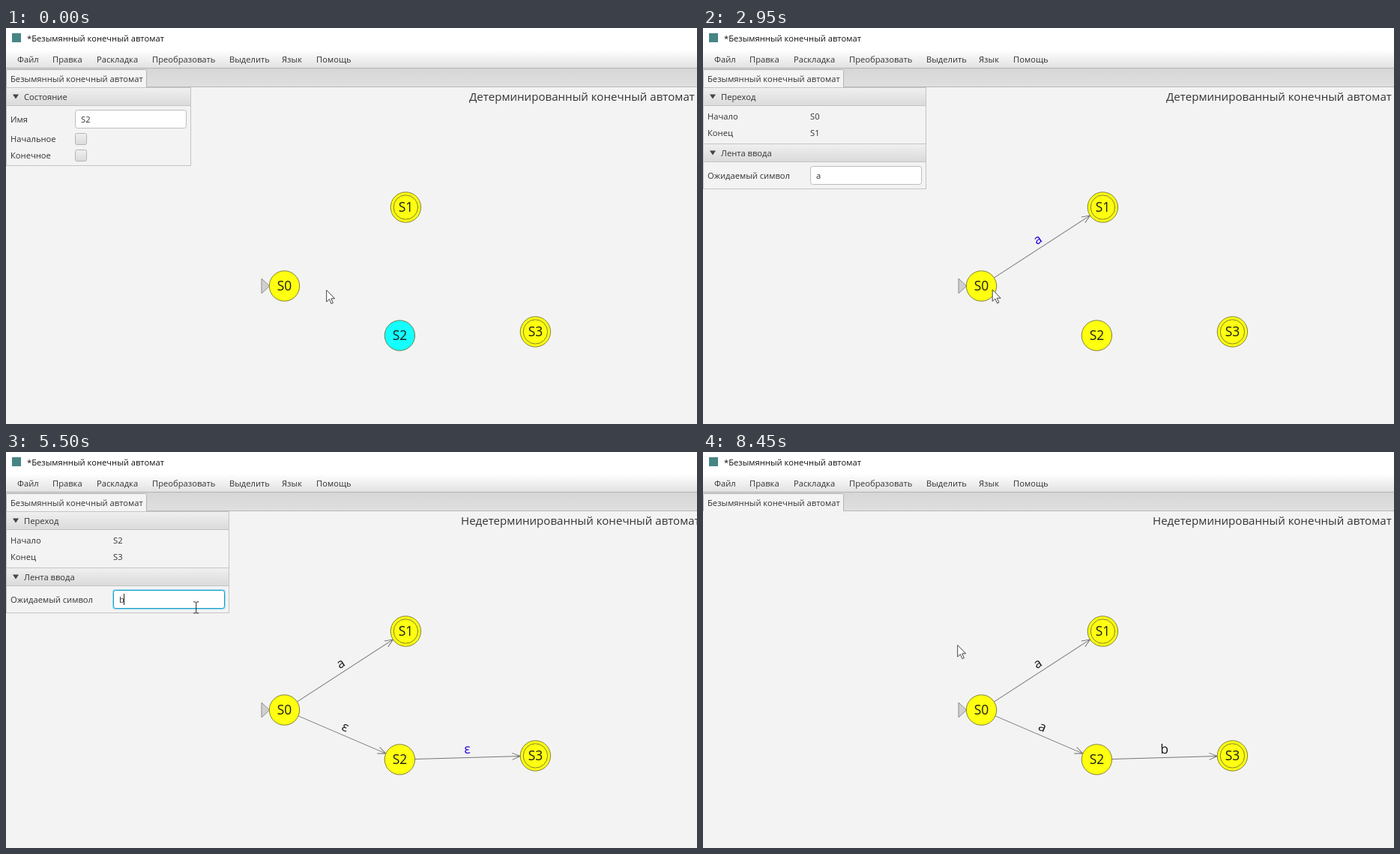
These frames come from a looping animation (922 by 528 pixels, 8950 ms). An HTML page:

```html
<!DOCTYPE html>
<html lang="ru">
<head>
<meta charset="utf-8">
<title>Конечный автомат</title>
<style>
  html, body { margin: 0; width: 100%; height: 100%; overflow: hidden; background: #f3f3f3; }
  svg { display: block; width: 922px; height: 528px; }
  text { font: 11.2px "Open Sans", "Noto Sans", sans-serif; fill: #333; white-space: pre; }
  .big { font-size: 17.4px; fill: #1c1c1c; }
  .heading { font-size: 15.1px; }
  .edge { fill: none; stroke: #777; stroke-width: 1; }
</style>
</head>
<body>
<svg viewBox="0 0 922 528">
  <defs>
    <linearGradient id="menu" x2="0" y2="1"><stop stop-color="#fff"/><stop offset="1" stop-color="#e2e2e2"/></linearGradient>
    <linearGradient id="tabs" x2="0" y2="1"><stop stop-color="#d6d6d6"/><stop offset="1" stop-color="#dfdfdf"/></linearGradient>
    <linearGradient id="bar" x2="0" y2="1"><stop stop-color="#f0f0f0"/><stop offset="1" stop-color="#dadada"/></linearGradient>
  </defs>
  <rect width="922" height="528" fill="#f3f3f3"/>
  <rect width="922" height="29" fill="#fff"/>
  <rect x="8" y="7" width="12" height="12" fill="#478585"/>
  <text x="28" y="18" style="fill:#111">*Безымянный конечный автомат</text>
  <rect y="29" width="922" height="24" fill="url(#menu)"/>
  <rect y="53" width="922" height="1" fill="#b4b4b4"/>
  <g id="menuItems"></g>
  <rect y="54" width="922" height="24" fill="url(#tabs)"/>
  <rect y="78" width="922" height="1" fill="#b8b8b8"/>
  <path d="M.5 79V57.5q0-2 2-2H185.500q2 0 2 2V79" fill="#f4f4f4" stroke="#b4b4b4"/>
  <text x="6" y="72">Безымянный конечный автомат</text>
  <g id="scene"></g>
</svg>
<script>
const LOOP = 8950, STEP = 50, RADIUS = 20;
const scene = document.getElementById('scene');

const text = (x, y, s, cls = '') => `<text x="${x}" y="${y}" class="${cls}">${s}</text>`;
const line = (a, b) => `<path class="edge" d="M${a.x} ${a.y}L${b.x} ${b.y}"/>`;

document.getElementById('menuItems').innerHTML = [
  [15, 'Файл'], [62, 'Правка'], [121, 'Раскладка'], [195, 'Преобразовать'],
  [298, 'Выделить'], [368, 'Язык'], [414, 'Помощь']
].map(([x, s]) => text(x, 46, s)).join('');

const states = {
  S0: { x: 371.5, y: 344, start: true },
  S1: { x: 533.4, y: 239, final: true },
  S2: { x: 525.4, y: 410 },
  S3: { x: 706.4, y: 405, final: true }
};

// pressed/created bound the drag; the symbol replaces ε when committed
const edges = [
  { from: 'S0', to: 'S1', pressed: 500, created: 1150, symbol: 'a', committed: 2900 },
  { from: 'S0', to: 'S2', pressed: 2900, created: 3450, symbol: 'a', committed: 8300 },
  { from: 'S2', to: 'S3', pressed: 3750, created: 4200, symbol: 'b', committed: 6150 }
];

const selections = [[1150, 0], [3450, 1], [4200, 2], [6150, 1], [8300, -1]];
const edits = [
  { focus: 1900, typed: 2100, end: 2900, symbol: 'a' },
  { focus: 5100, typed: 5350, end: 6150, symbol: 'b' },
  { focus: 6900, typed: 7350, end: 8300, symbol: 'a' }
];

// time, x, y of the pointer
const pointerPath = [
  [0, 428, 350], [400, 384, 338], [500, 384, 338], [1050, 511, 249], [1200, 525, 243],
  [1800, 236, 197], [2100, 236, 197], [2300, 246, 211], [2800, 383, 348], [2900, 383, 348],
  [3450, 533, 405], [3650, 541, 407], [3750, 541, 407], [4200, 694, 407], [4550, 317, 234],
  [4750, 317, 234], [5050, 242, 198], [5400, 242, 198], [6100, 454, 367], [6300, 454, 367],
  [6850, 230, 198], [7500, 230, 198], [7850, 340, 258], [LOOP, 340, 258]
];

function pointerAt(t) {
  const i = Math.max(1, pointerPath.findIndex(k => k[0] >= t));
  const [t0, x0, y0] = pointerPath[i - 1], [t1, x1, y1] = pointerPath[i];
  const u = (t - t0) / (t1 - t0), e = u * u * (3 - 2 * u);
  return { x: x0 + (x1 - x0) * e, y: y0 + (y1 - y0) * e };
}

function selectedAt(t) {
  const past = selections.filter(s => s[0] <= t);
  return past.length ? edges[past[past.length - 1][1]] : null;
}

const symbolAt = (edge, t) => t >= edge.committed ? edge.symbol : 'ε';

function drawState([name, s], active) {
  const circle = (r, fill) => `<circle cx="${s.x}" cy="${s.y}" r="${r}" fill="${fill}" stroke="#74743a" stroke-width=".9"/>`;
  return (s.start ? `<path d="M${s.x - 30.5} ${s.y - 10}l10.500 10-10.500 10z" fill="#d0d0d0" stroke="#8c8c8c"/>` : '') +
    circle(RADIUS + .2, active ? '#14ffff' : '#ffff10') + (s.final ? circle(16.2, 'none') : '') +
    `<text class="big" x="${s.x}" y="${s.y + 6}" text-anchor="middle">${name}</text>`;
}

function drawEdge(edge, t, active) {
  const a = states[edge.from], b = states[edge.to];
  const length = Math.hypot(b.x - a.x, b.y - a.y);
  const angle = Math.atan2(b.y - a.y, b.x - a.x) * 180 / Math.PI;
  const tip = length - RADIUS;
  return `<g transform="translate(${a.x} ${a.y}) rotate(${angle})">
    <path class="edge" d="M${RADIUS} 0H${tip}m-11-4.500l11 4.500-11 4.500"/>
    <text class="big" x="${length / 2}" y="-5.500" text-anchor="middle"
      style="fill:${active ? '#1a00d8' : '#1c1c1c'}">${symbolAt(edge, t)}</text></g>`;
}

const panelBox = (w, h) =>
  `<rect x=".5" y="79.500" width="${w}" height="${h}" fill="#f3f3f3" stroke="#c4c4c4"/>`;

const panelHeader = (y, w, title) =>
  `<rect x=".5" y="${y + .5}" width="${w}" height="24" fill="url(#bar)" stroke="#c4c4c4"/>
   <path d="M9 ${y + 9.5}h8l-4 6z" fill="#444"/>` + text(24, y + 17, title);

function inputField(x, y, value, focused) {
  const glow = focused
    ? `<rect x="${x - 1}" y="${y - 1}" width="151" height="27" rx="4" fill="#9ad9ee"/>` : '';
  return glow + `<rect x="${x + .5}" y="${y + .5}" width="148" height="24" rx="3" fill="#fff"
    stroke="${focused ? '#169fcb' : '#bdbdbd'}"/>` + text(x + 8, y + 17, value);
}

const checkBox = y =>
  `<rect x="92.500" y="${y + .5}" width="15" height="15" rx="2" fill="url(#bar)" stroke="#b5b5b5"/>`;

function statePanel() {
  return panelBox(246, 104) + panelHeader(79, 246, 'Состояние') +
    text(6, 126, 'Имя') + inputField(92, 109, 'S2') +
    text(6, 152, 'Начальное') + checkBox(140) +
    text(6, 174, 'Конечное') + checkBox(162);
}

function edgePanel(edge, t) {
  const edit = edits.find(e => t >= e.focus && t < e.end);
  const typed = edit && t >= edit.typed;
  const value = edit ? (typed ? edit.symbol : '') : symbolAt(edge, t);
  const caretOn = edit && (!typed || (t - edit.typed + 250) % 1000 < 500);
  return panelBox(297, 135) + panelHeader(79, 297, 'Переход') +
    text(6, 122, 'Начало') + text(143, 122, edge.from) +
    text(6, 144, 'Конец') + text(143, 144, edge.to) +
    panelHeader(154, 297, 'Лента ввода') +
    text(6, 201, 'Ожидаемый символ') + inputField(143, 184, value, edit) +
    (caretOn ? `<rect x="${typed ? 157 : 151}" y="189" width="1" height="15" fill="#222"/>` : '');
}

function heading(t) {
  const made = edges.filter(e => t >= e.created);
  const nondeterministic = made.length > 1;
  const hasEpsilon = made.some(e => symbolAt(e, t) === 'ε');
  const x = nondeterministic ? (hasEpsilon ? 607 : 600) : (hasEpsilon ? 624 : 618);
  const kind = nondeterministic ? 'Недетерминированный' : 'Детерминированный';
  return text(x, 97, `${kind} конечный автомат${hasEpsilon ? '' : ' без'}`, 'heading');
}

function drawPointer({ x, y }, overField) {
  const shape = overField
    ? '<path d="M-3.500-7.500h2.500l1 1 1-1h2.500M0-6.500V6.500M-3.500 7.500h2.500l1-1 1 1h2.500" fill="none" stroke="#222"/>'
    : '<path d="M-.3-.5V15l3.700-3.400 2.600 6 2.400-1-2.600-5.800h4.900z" fill="#fff" stroke="#444"/>';
  return `<g transform="translate(${x} ${y})">${shape}</g>`;
}

function render(t) {
  const selected = selectedAt(t);
  const pointer = pointerAt(t);
  const drag = edges.find(e => t > e.pressed && t < e.created);
  const initial = t < selections[0][0];
  const overField = selected && pointer.x > 143 && pointer.x < 291 && pointer.y > 184 && pointer.y < 212;
  scene.innerHTML = heading(t) +
    (drag ? line(states[drag.from], pointerAt(t - 15)) : '') +
    edges.filter(e => t >= e.created).map(e => drawEdge(e, t, e === selected)).join('') +
    Object.entries(states).map(s => drawState(s, initial && s[0] === 'S2')).join('') +
    (initial ? statePanel() : selected ? edgePanel(selected, t) : '') +
    drawPointer(pointer, overField);
}

const began = performance.now();
function tick() {
  const t = Math.max(0, performance.now() - began) % LOOP;
  render(Math.floor(t / STEP) * STEP);
  requestAnimationFrame(tick);
}
tick();
</script>
</body>
</html>
```
